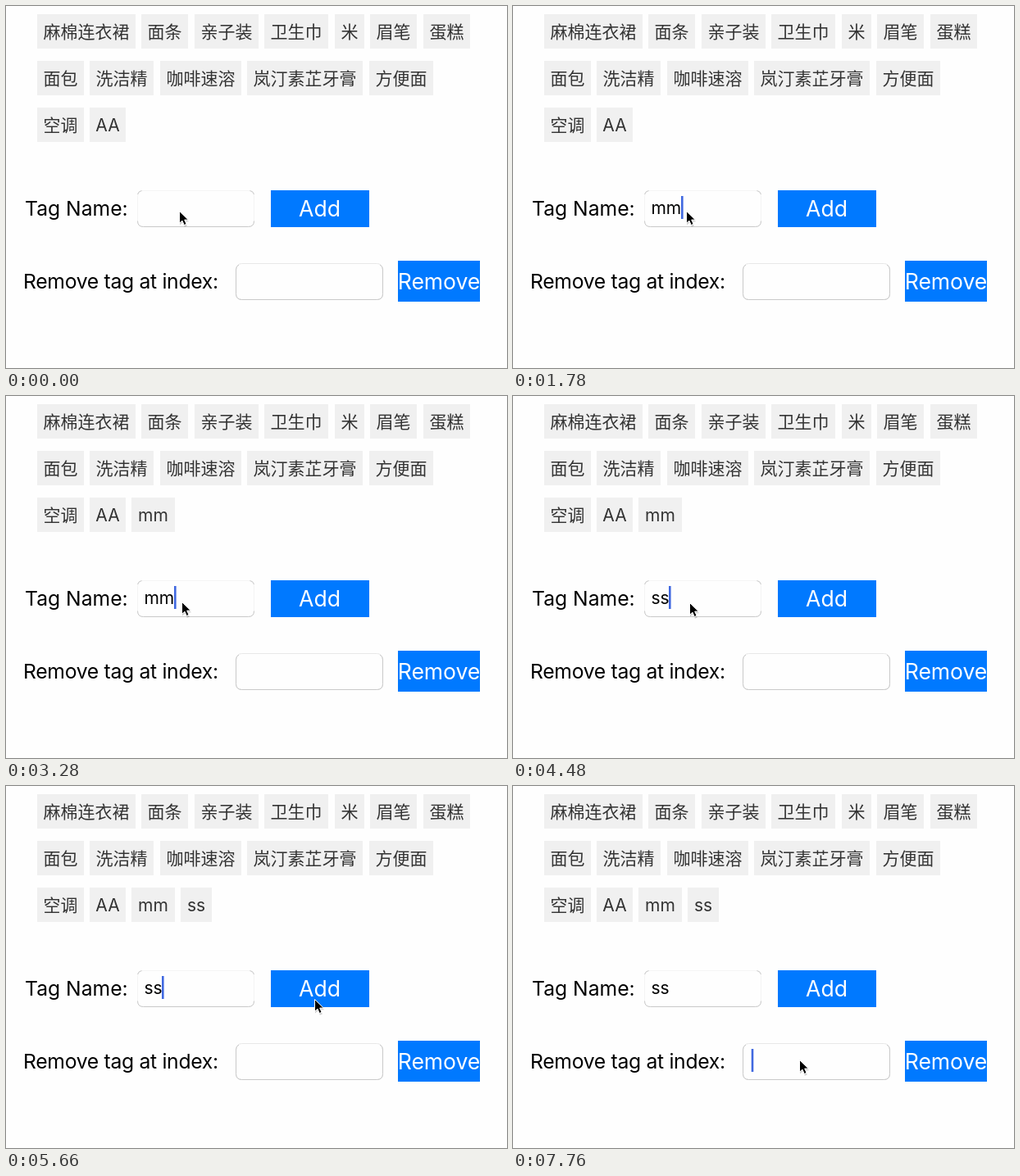
Recreate the animation shown at these times as an HTML page. Size 611 by 442 pixels, loop 8000 ms.

```html
<!DOCTYPE html>
<html lang="zh-CN">
<head>
<meta charset="utf-8">
<title>Tag editor</title>
<style>
html, body { margin: 0; width: 100%; height: 100%; overflow: hidden; background: #fefefe; }
svg { display: block; }
text { font-family: Inter, "Noto Sans CJK SC", "Noto Sans CJK", sans-serif; font-optical-sizing: none; }
.tag rect { fill: #f0f0f0; }
.tag text { font-size: 21px; fill: #333; text-anchor: middle; }
.label { font-size: 24.7px; }
.button rect { fill: #0079ff; }
.button text { font-size: 26.6px; fill: #fff; text-anchor: middle; }
.field { fill: none; stroke: #c9c9c9; }
.rim { fill: none; stroke: #e8e8e8; }
#typed { font-size: 21px; letter-spacing: -.1px; }
#caret { fill: #4169e0; }
</style>
</head>
<body>
<svg width="611" height="442" viewBox="0 0 611 442">
  <g id="tags"></g>
  <text class="label" x="23" y="256">Tag Name:</text>
  <text class="label" x="21" y="345" letter-spacing="-.3">Remove tag at index:</text>
  <rect class="rim" x="160.5" y="225.5" width="142" height="44" rx="7" stroke-opacity=".45"/>
  <path class="field" d="M160.5 262.5q0 7 7 7h128q7 0 7-7M160.5 230q1-4 5-4.500M297.500 225.500q4 .5 5 4.500"/>
  <rect class="rim" x="280.5" y="314.5" width="179" height="44" rx="7"/>
  <path class="field" d="M284 316q-3.500 2-3.500 6v29.500q0 7 7 7h165q7 0 7-7v-29.500q0-4-3.500-6"/>
  <g class="button"><rect x="323" y="225" width="120" height="45"/><text x="382.500" y="257">Add</text></g>
  <g class="button"><rect x="478" y="311" width="100" height="50"/><text x="528" y="346" letter-spacing="-.1">Remove</text></g>
  <text id="typed" x="168.500" y="253.500"></text>
  <rect id="caret" width="2.600" height="28"/>
  <g id="pointer">
    <path d="M.5 1.500v15l3.500-3.200 2.400 5.500 3-1.300-2.400-5.300h4.700z" fill="#000" opacity=".18" transform="translate(.5 1)"/>
    <path d="M.5.5v14.800l3.400-3.200 2.400 5.400 2.800-1.200-2.400-5.200h4.700z" fill="#000" stroke="#fff" stroke-width="1"/>
  </g>
</svg>
<script>
const LOOP = 8000;
const $ = id => document.getElementById(id);

// Tag rows: text, left, width
const rows = [
  [['麻棉连衣裙', 38, 120], ['面条', 165, 57], ['亲子装', 230, 78], ['卫生巾', 315, 78],
   ['米', 401, 36], ['眉笔', 444, 57], ['蛋糕', 509, 57]],
  [['面包', 38, 57], ['洗洁精', 102, 78], ['咖啡速溶', 188, 99], ['岚汀素芷牙膏', 294, 141], ['方便面', 443, 78]],
  [['空调', 38, 57], ['AA', 102, 44], ['mm', 153, 53], ['ss', 213, 38]]
];

function svg(name, attrs, parent) {
  const el = document.createElementNS('http://www.w3.org/2000/svg', name);
  for (const key in attrs) el.setAttribute(key, attrs[key]);
  return parent.appendChild(el);
}

const tags = {};
rows.forEach((row, i) => row.forEach(([label, x, width]) => {
  const y = 10 + 57 * i;
  const g = svg('g', { class: 'tag' }, $('tags'));
  svg('rect', { x, y, width, height: 42 }, g);
  svg('text', { x: x + width / 2, y: y + 28.5 }, g).textContent = label;
  tags[label] = g;
}));

// Each step: start time, value held until the next step
const typing = [[0, ''], [1490, 'm'], [1780, 'mm'], [3880, 'm'], [4030, ''], [4180, 's'], [4480, 'ss']];
const blink = [
  [0, 0], [290, .5], [440, 1], [890, .5], [1040, 0], [1340, .5], [1490, 1],
  [2230, .5], [2380, 0], [2830, .5], [2980, 1], [3430, .5], [3580, 0], [3880, 1],
  [4770, .5], [4920, 0], [5360, .5], [5510, 1], [5960, 0],
  [6560, .5], [6710, 1], [7160, .5], [7310, 0], [7610, .5], [7760, 1]
];
const moves = [
  [0, 211, 250], [2230, 238, 260], [2380, 318, 272], [2530, 380, 256], [2680, 387, 249],
  [2830, 372, 258], [2980, 276, 268], [3130, 216, 255], [3280, 214, 251], [3430, 215, 252],
  [4620, 240, 260], [4770, 314, 270], [4920, 370, 254], [5060, 379, 247],
  [5660, 376, 260], [5810, 364, 300], [5960, 355, 326], [6110, 352, 332],
  [6560, 351, 333], [6710, 350, 334], [6860, 349, 334]
];
const caretX = { '': 170, m: 187.5, mm: 205, s: 179.7, ss: 190 };

const at = (steps, t) => steps.findLast(step => step[0] <= t);

function draw(t) {
  const text = at(typing, t)[1];
  const [, x, y] = at(moves, t);
  const removing = t >= 5960;
  $('typed').textContent = text;
  $('caret').setAttribute('x', removing ? 290.7 : caretX[text]);
  $('caret').setAttribute('y', removing ? 321 : 232);
  $('caret').setAttribute('opacity', at(blink, t)[1]);
  $('pointer').setAttribute('transform', `translate(${x} ${y})`);
  tags.mm.setAttribute('visibility', t >= 2680 ? 'visible' : 'hidden');
  tags.ss.setAttribute('visibility', t >= 5360 ? 'visible' : 'hidden');
}

const start = performance.now();
function tick(now) {
  draw(Math.max(0, now - start) % LOOP);
  requestAnimationFrame(tick);
}
draw(0);
requestAnimationFrame(tick);
</script>
</body>
</html>
```
